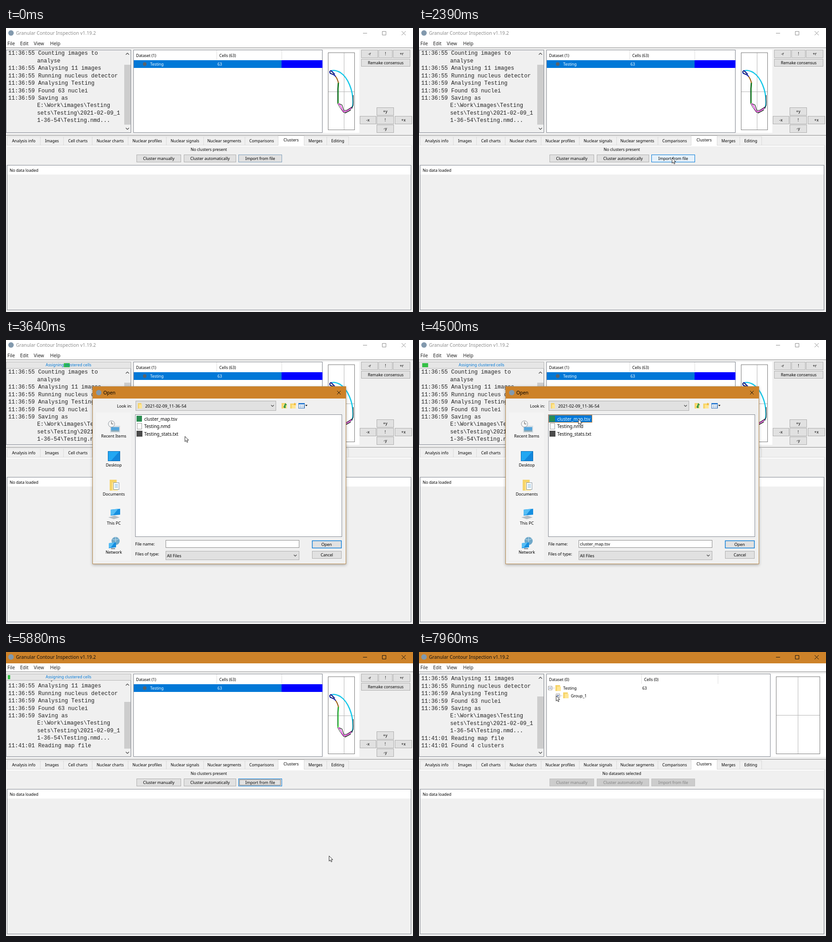
Recreate the animation shown at these times as an HTML page. Size 895 by 626 pixels, loop 8000 ms.

```html
<!DOCTYPE html>
<html lang="en">
<head>
<meta charset="utf-8">
<title>Importing clusters</title>
<style>
html, body { margin: 0; width: 100%; height: 100%; overflow: hidden; background: #f0f0f0; }
svg { display: block; }
text { font-family: "Noto Sans", "Open Sans", sans-serif; white-space: pre; }
.log text { font: 12.17px "Liberation Mono", monospace; fill: #222; }
.off rect { fill: #ccc; stroke: #bfbfbf; }
.off text { fill: #838383; }
.fading rect { stroke: #7c9dbb; }
.hot rect { fill: #e5f1fb; stroke: #0078d7; }
.focus rect { stroke: #0078d7; }
</style>
</head>
<body>
<svg id="stage" width="895" height="626" viewBox="0 0 895 626"></svg>
<script>
const LOOP = 8000;
const ORANGE = '#cd8229', BLUE = '#0078d7', EDGE = '#828790', FACE = '#f0f0f0';

const fill = (x, y, w, h, color) => `<rect x="${x}" y="${y}" width="${w}" height="${h}" fill="${color}"/>`;
const box = (x1, y1, x2, y2, color, stroke, width = 1) =>
  `<rect x="${x1 + .5}" y="${y1 + .5}" width="${x2 - x1 - 1}" height="${y2 - y1 - 1}" fill="${color}" stroke="${stroke}" stroke-width="${width}"/>`;
const text = (x, y, s, size = 8.75, color = '#000', anchor = 'start') =>
  `<text x="${x}" y="${y}" font-size="${size}" fill="${color}" text-anchor="${anchor}">${s}</text>`;
const centred = (x, y, s, size, color) => text(x, y, s, size, color, 'middle');
const line = (d, color, width = 1, extra = '') =>
  `<path d="${d}" fill="none" stroke="${color}" stroke-width="${width}" ${extra}/>`;
const shape = (d, color) => `<path d="${d}" fill="${color}"/>`;
const group = (id, body, extra = '') => `<g id="${id}" ${extra}>${body}</g>`;
const button = (x1, y1, x2, y2, s, id = '') =>
  `<g ${id && `id="${id}"`}>${box(x1, y1, x2, y2, '#e1e1e1', '#adadad')}${centred((x1 + x2) / 2, (y1 + y2) / 2 + 3, s)}</g>`;
const chevron = (x, y, dir, size = 3.5) =>
  line(`M${x - size} ${y - dir * size / 2}l${size} ${dir * size} ${size} ${-dir * size}`, '#444', 1.2);
const folder = (x, y, w = 12, h = 13) =>
  fill(x, y, w * .85, h, '#f6d469') + fill(x + w * .3, y + h * .25, w * .7, h * .75, '#ffe694');
const expander = (x, y, plus) => box(x - 4, y - 4, x + 5, y + 5, '#fff', '#919191') +
  line(`M${x - 2} ${y + .5}h5` + (plus ? `M${x + .5} ${y - 2}v5` : ''), '#2b4a8c');
const appIcon = (x, y) => `<circle cx="${x + 7}" cy="${y + 7}" r="6" fill="#8299ad"/>`;

const LOG = [
  '11:36:55 Counting images to', '>analyse', '11:36:55 Analysing 11 images',
  '11:36:55 Running nucleus detector', '11:36:59 Analysing Testing', '11:36:59 Found 63 nuclei',
  '11:36:59 Saving as', '>E:\\Work\\images\\Testing', '>sets\\Testing\\2021-02-09_1',
  '>1-36-54\\Testing.nmd...', '11:41:01 Reading map file', '11:41:01 Found 4 clusters'];

function logPanel() {
  const lines = LOG.map((s, i) => {
    const wrapped = s[0] === '>';
    return `<text x="${wrapped ? 68.5 : 5}" y="${3.3 + i * 16.45}" id="log${i}">${wrapped ? s.slice(1) : s}</text>`;
  }).join('');
  return box(0, 48, 275, 231, FACE, EDGE) + group('log', lines, 'class="log"') +
    fill(260, 49, 14, 181, FACE) + `<rect id="thumb" x="260" width="14" fill="#cdcdcd"/>` +
    group('upArrow', chevron(267, 0, -1)) + chevron(267, 222, 1);
}

function titleAndMenu() {
  const menu = [['File', 3], ['Edit', 31], ['View', 61], ['Help', 97]]
    .map(([s, x]) => text(x, 38, s, 10.4, '#222')).join('');
  return fill(0, 0, 895, 43, '#fff') + fill(0, 43, 895, 5, FACE) + line('M0 43.5H895', '#8a8a8a') +
    `<rect id="titleBar" width="895" height="25"/>` + menu + appIcon(4, 4) +
    `<g id="titleInk">${text(22, 15, 'Granular Contour Inspection v1.19.2', 10.3, 'currentColor')}` +
    line('M785 11.5h9M827.5 7.5h8v8h-8zM870 7l9 9m0-9l-9 9', 'currentColor') + '</g>';
}

function progressBar() {
  return box(0, 48, 275, 63, '#e6e6e6', '#b5b5b5') +
    `<svg x="4" y="51" width="268" height="9"><rect id="block" width="13" height="9" fill="#35c046"/></svg>` +
    centred(137.5, 58, 'Assigning clustered cells', 8.75, BLUE);
}

function table(right, columns, heads) {
  return box(280, 48, right, 231, '#fff', EDGE) + columns.map(x => line(`M${x + .5} 49V70`, '#dedede')).join('') +
    text(286, 64, heads[0]) + text(columns[0] + 6, 64, heads[1]);
}

function chart(x1, x2, midX, midY) {
  return line(`M${midX + .5} 55V224M${x1} ${midY + .5}H${x2}`, '#b5b5b5') + box(x1, 54, x2, 225, 'none', '#777');
}

function consensus() {
  const curve = 'M713 95Q722 91 735 98C752 109 763 137 763 163Q763 172 760 177';
  const tail = 'M760 175Q755 182 743 185Q739 181 737 174L731 166';
  return line(curve, '#19c8e8', 2.6) + line('M763.5 148V170L760 178', '#111', 1.2) +
    line('M730 166V134L731 120', '#0b8a12', 2.8, 'id="side"') + line('M729.5 163V130L730.5 121', '#123', .7) +
    line('M731 121Q729 112 724 106', '#d9862b', 2.4) + line('M731 120Q729 111 723 104', '#222', .7) +
    line('M725 107Q722 103 713 100Q710 95 715 94L723 102', '#1424c8', 2.2) +
    line('M724 105L717 97Q712 92 712 97Q715 102 720 102', '#111') +
    line(tail, '#e83ce0', 1.8) + line('M759 179Q750 187 742 186L734 175 729 166', '#111', .9) +
    line('M761 174L750 181 743 182 739 170 733 167M758 181L745 188', '#111', 1.1);
}

function before() {
  const side = [[781, 48, 818, 66, '-r'], [819, 48, 850, 66, '!'], [851, 48, 889, 66, '+r'],
    [781, 68, 889, 85, 'Remake consensus'], [815, 175, 853, 193, '+y'], [778, 194, 814, 212, '-x'],
    [815, 194, 853, 212, '!'], [855, 194, 893, 212, '+x'], [815, 213, 853, 231, '-y']];
  return table(696, [463, 606], ['Dataset (1)', 'Cells (63)']) +
    fill(281, 71, 325, 17, BLUE) + fill(606, 71, 90, 17, '#00f') +
    line('M289 79.5h9', '#53728c', 1, 'stroke-dasharray="1 1"') + '<circle cx="305" cy="79.5" r="4" fill="#59626a"/>' +
    text(317, 83, 'Testing', 8.75, '#fff') + text(465, 83, '63', 8.75, '#fff') +
    fill(697, 48, 80, 183, '#fff') + chart(708, 767, 743, 140) + consensus() +
    side.map(b => button(...b)).join('');
}

function after() {
  return table(773, [489, 657], ['Dataset (0)', 'Cells (0)']) + fill(773, 48, 122, 183, '#fff') +
    chart(785, 882, 833, 139) + line('M772.5 48V231', EDGE) +
    group('closed', expander(288, 79, true)) +
    group('opened', expander(288, 79, false) + line('M293 79.5h6M310 96.5h6', '#999', 1, 'stroke-dasharray="1 1"') +
      expander(305, 96, true) + folder(317, 89) + text(334, 99.5, 'Group_1')) +
    folder(300, 73) + text(317, 83, 'Testing') + text(491, 83, '63');
}

function lowerPane() {
  const names = ['Analysis info', 'Images', 'Cell charts', 'Nuclear charts', 'Nuclear profiles', 'Nuclear signals',
    'Nuclear segments', 'Comparisons', 'Clusters', 'Merges', 'Editing'];
  const edges = [2, 75, 126, 189, 268, 352, 434, 525, 598, 655, 705, 753];
  const tabs = names.map((s, i) => {
    const on = s === 'Clusters';
    return box(edges[i], on ? 237 : 239, edges[i + 1] + 1, on ? 261 : 259, on ? '#fff' : FACE, '#d9d9d9') +
      centred((edges[i] + edges[i + 1]) / 2 + .5, on ? 250 : 252, s);
  }).join('');
  return line('M0 236.5H895', '#8a8a8a') + line('M2 258.5H892V622', '#d9d9d9') + tabs + fill(2, 259, 889, 2, '#fff') +
    '<text id="status" x="446" y="270.5" font-size="8.75" text-anchor="middle"></text>' +
    group('clusterButtons', button(287, 279, 385, 296, 'Cluster manually') +
      button(391, 279, 506, 296, 'Cluster automatically') + button(511, 279, 607, 296, 'Import from file', 'import') +
      group('dots', line('M513.5 281.5h90v12h-90z', '#111', 1, 'stroke-dasharray="1 1"'))) +
    box(2, 302, 891, 622, FACE, EDGE) + fill(3, 303, 887, 20, '#fff') + text(8, 317, 'No data loaded');
}

function places() {
  const screen = (x, y, w, h) => shape(`M${x} ${y + 2}l${w}-2v${h}l${-w} 2z`, '#168fe0') +
    shape(`M${x} ${y + 2}l${w * .8}-2-${w * .5} ${h}-${w * .3} 1z`, '#55bdf5');
  const sheet = (x, y) => box(x, y, x + 13, y + 16, '#fff', '#8a9aa8') +
    line(`M${x + 3} ${y + 4.5}h7m-7 3h7m-7 3h7`, '#5aa3d8');
  const icons = [
    fill(229, 189, 22, 15, '#d5dde3') + fill(231, 192, 18, 8, '#55a6dc') + fill(231, 199, 18, 3, '#8caab8') +
      '<circle cx="232" cy="185" r="7" fill="#f5f5f5" stroke="#8a939b"/>' + line('M232 180v5h4', '#444'),
    box(224, 245, 251, 267, '#1287dc', '#0b6bb5') + shape('M225 246h24L231 266h-6z', '#22a7f2'),
    folder(228, 308, 18, 24) + sheet(236, 314),
    screen(230, 372, 21, 13) + shape('M225 391l14-4 11 4-13 4z', '#b5bdc4'),
    '<circle cx="241" cy="443" r="9" fill="#6fa8c9"/>' + line('M234 439q7 4 14-1M241 434v17', '#c9e2ef') +
      screen(226, 446, 16, 11) + fill(231, 459, 9, 2, '#788793')];
  return ['Recent Items', 'Desktop', 'Documents', 'This PC', 'Network']
    .map((s, i) => icons[i] + centred(237, 215 + i * 64, s, 9)).join('');
}

function dialog() {
  const sheet = box(288, 183, 299, 197, '#fff', '#999');
  return fill(190, 102, 558, 392, FACE) + fill(198, 160, 77, 326, '#f4f4f4') + fill(190, 102, 558, 27, ORANGE) +
    box(190, 102, 748, 494, 'none', '#b98a4c') + appIcon(197, 109) + text(214, 120, 'Open', 10.4) +
    line('M728 112l8 8m0-8l-8 8', '#111') + text(277, 148.5, 'Look in:', 9, '#000', 'end') +
    box(285, 134, 594, 156, '#e1e1e1', '#adadad') + folder(290, 139, 9, 12) + text(306, 148.5, '2021-02-09_11-36-54', 9.3) +
    chevron(586, 145, 1, 3) + folder(606, 139, 12, 12) + shape('M610 148l4-9 4 4-3 1v6h-3z', '#3a9b46') +
    folder(625, 140, 12, 11) + shape('M634 138l2 2 2-1-1 3 1 2-3-1-2 1z', '#f2b632') +
    box(643, 139, 657, 151, '#fff', '#2b6cb5') + fill(643, 139, 14, 3, '#2b7bd1') +
    line('M646 145h2m2 0h2m2 0h2M646 148h2m2 0h2m2 0h2', '#3b78b8', 1.4) + shape('M658 143h5l-2.5 3z', '#111') +
    places() + box(284, 164, 739, 434, '#fff', EDGE) +
    group('picked', box(285, 165, 381, 182, BLUE, '#d98a35')) + fill(287, 167, 12, 13, '#2a8c50') +
    '<text id="firstFile" x="304" y="177.5" font-size="9.9">cluster_map.tsv</text>' + sheet +
    text(304, 193.5, 'Testing.nmd', 9.9) + fill(287, 200, 13, 13, '#4b4b4b') + text(304, 210.5, 'Testing_stats.txt', 9.9) +
    text(284, 453, 'File name:', 9) + box(351, 441, 645, 458, '#fff', '#8a8a8a') +
    group('typed', text(354, 453, 'cluster_map.tsv', 9)) + group('caret', line('M354.5 444v11', '#000')) +
    text(284, 475, 'Files of type:', 9) + box(351, 465, 645, 485, '#e1e1e1', '#adadad') +
    text(354, 478.5, 'All Files', 9) + chevron(636, 475, 1, 3) +
    `<g id="open">${box(673, 442, 738, 459, '#e1e1e1', BLUE, 1.4)}${centred(705, 453.5, 'Open', 9)}</g>` +
    button(673, 465, 738, 482, 'Cancel');
}

document.getElementById('stage').innerHTML =
  fill(0, 0, 895, 626, FACE) + logPanel() + titleAndMenu() + line('M0 48.5H275', EDGE) +
  group('progress', progressBar()) + group('before', before()) + group('after', after()) + lowerPane() +
  group('dialog', dialog(), 'style="filter:drop-shadow(0 2px 3px rgba(0,0,0,.3))"') +
  group('arrow', `<path d="M.5 .5V12L3.2 9.5 5 13.7 6.9 12.9 5.1 8.8H8.7Z" fill="#fff" stroke="#111" stroke-width=".9"/>`) +
  group('busy', '<circle cx="288" cy="80" r="8.5" fill="none" stroke="#2f9be0" stroke-width="4"/>');

const ui = {};
document.querySelectorAll('[id]').forEach(el => ui[el.id] = el);
const show = (el, on) => el.setAttribute('display', on ? 'inline' : 'none');

// Pointer moves: start, last step, step count, destination, optional bend.
const START = [775, 650];
const MOVES = [
  [300, 1060, 11, [476, 107], [205, 330]],
  [1140, 1540, 6, [449, 78]],
  [1690, 2390, 10, [556, 286]],
  [3130, 3640, 7, [393, 212]],
  [3720, 4100, 6, [350, 174]],
  [4570, 5260, 10, [714, 458]],
  [5420, 5500, 2, [710, 449]],
  [6340, 7120, 11, [289, 81]],
  [7200, 7200, 1, [288, 80]],
  [7810, 7960, 3, [301, 96]]];

function pointer(t) {
  let from = START;
  for (const [a, b, steps, to, bend] of MOVES) {
    if (t < a) break;
    if (t < b) {
      const k = Math.floor((t - a) / (b - a) * (steps - 1)) + 1;
      const u = k / steps, e = u * u * (3 - 2 * u), v = 1 - e;
      return from.map((p, i) => {
        const mid = bend ? bend[i] : (p + to[i]) / 2;
        return v * v * p + 2 * v * e * mid + e * e * to[i];
      });
    }
    from = to;
  }
  return from;
}

const WRAP = 282;
const LEAD = [[2930, 2], [3050, 14], [3640, 136], [5340, 174 + WRAP], [5880, 5 + 2 * WRAP], [6110, 53 + 2 * WRAP]];
function blockLead(t) {
  const i = Math.max(1, LEAD.findIndex(p => p[0] >= t));
  const [[t0, x0], [t1, x1]] = [LEAD[i - 1], LEAD[i]];
  return (x0 + (x1 - x0) * (t - t0) / (t1 - t0)) % WRAP;
}

function dialogPhase(t) {
  if (t < 3050 || t >= 5730) return 0;
  if (t < 3090) return .36;
  if (t < 3170) return .8;
  return t < 5580 ? 1 : t < 5650 ? .6 : .15;
}

function update(t) {
  const running = t >= 2930 && t < 6040, reading = t >= 5800, done = t >= 6040;
  const active = (t >= 2850 && t < 3010) || t >= 5620;
  const [px, py] = pointer(t);

  ui.titleBar.setAttribute('fill', active ? ORANGE : '#fff');
  ui.titleInk.setAttribute('color', active ? '#111' : '#8d8d8d');

  const [logTop, thumbTop] = done ? [26, 98] : reading ? [42, 110] : running ? [71, 94] : [56, 81];
  ui.log.setAttribute('transform', `translate(0 ${logTop})`);
  ui.thumb.setAttribute('y', thumbTop);
  ui.thumb.setAttribute('height', 213 - thumbTop);
  ui.upArrow.setAttribute('transform', `translate(0 ${running ? 72 : 57})`);
  show(ui.log10, reading);
  show(ui.log11, done);
  show(ui.progress, running);
  if (running) ui.block.setAttribute('x', blockLead(t) - 13);

  show(ui.before, !done);
  show(ui.after, done);
  show(ui.closed, t < 7430);
  show(ui.opened, t >= 7430);
  ui.side.setAttribute('stroke', t < 2850 ? '#0b8a12' : '#2fd635');

  const overImport = t < 3170 && px >= 511 && px < 607 && py >= 279 && py < 296;
  const focused = t >= 5620 && !done;
  ui.status.textContent = done ? 'No datasets selected' : 'No clusters present';
  ui.clusterButtons.setAttribute('class', done ? 'off' : '');
  ui.import.setAttribute('class', t < 70 ? 'fading' : overImport ? 'hot' : focused ? 'focus' : '');
  show(ui.dots, focused);

  const phase = dialogPhase(t), scale = .95 + .05 * phase, picked = t >= 4260;
  show(ui.dialog, phase > 0);
  ui.dialog.setAttribute('opacity', phase);
  ui.dialog.setAttribute('transform', `translate(469 298) scale(${scale}) translate(-469 -298)`);
  show(ui.picked, picked);
  show(ui.typed, picked);
  show(ui.caret, t < 3500);
  ui.firstFile.setAttribute('fill', picked ? '#fff' : '#000');
  ui.open.setAttribute('class', px >= 673 && px < 738 && py >= 442 && py < 459 ? 'hot' : '');

  const busy = t >= 7350 && t < 7430;
  show(ui.busy, busy);
  show(ui.arrow, t >= 300 && !busy);
  ui.arrow.setAttribute('transform', `translate(${px} ${py})`);
}

const started = performance.now();
function tick() {
  update((performance.now() - started) % LOOP);
  requestAnimationFrame(tick);
}
tick();
</script>
</body>
</html>
```
